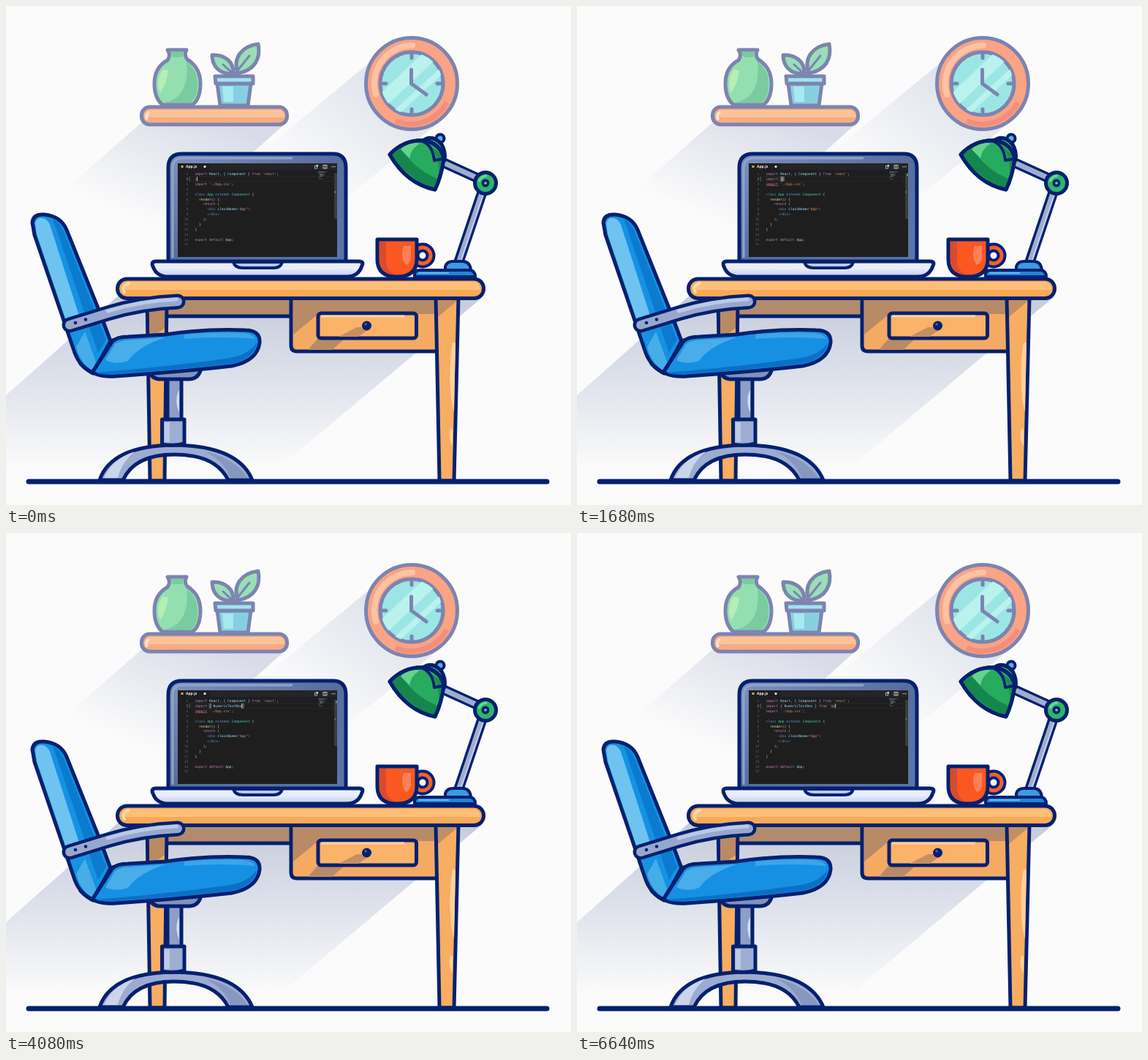
These frames come from a looping animation (773 px wide and 682 px high, 6.8 s). An HTML page:

```html
<!DOCTYPE html>
<html lang="en">
<head>
<meta charset="utf-8">
<title>Desk with code editor</title>
<style>
html, body { margin: 0; width: 100%; height: 100%; overflow: hidden; background: #fbfbfb; }
svg { display: block; width: 773px; height: 682px; }
.ink { stroke: #04206f; stroke-width: 5; stroke-linejoin: round; stroke-linecap: round; }
.soft { stroke: #7c84b0; stroke-width: 5; stroke-linejoin: round; stroke-linecap: round; }
.line { fill: none; }
.code text { font: 4.635px "DejaVu Sans Mono", monospace; white-space: pre; text-rendering: geometricPrecision; }
.code .tab { font: bold 5px "Open Sans", sans-serif; }
</style>
</head>
<body>
<svg viewBox="0 0 773 682">
  <defs>
    <linearGradient id="deskShade" x1="0" y1="395" x2="0" y2="632" gradientUnits="userSpaceOnUse">
      <stop offset="0" stop-color="#c6cbdb"/><stop offset=".45" stop-color="#dce0ea"/><stop offset="1" stop-color="#fbfbfb"/>
    </linearGradient>
    <linearGradient id="shelfShade" x1="290" y1="155" x2="225" y2="310" gradientUnits="userSpaceOnUse">
      <stop offset="0" stop-color="#d9dce8"/><stop offset="1" stop-color="#fbfbfb"/>
    </linearGradient>
    <linearGradient id="clockShade" x1="530" y1="100" x2="420" y2="245" gradientUnits="userSpaceOnUse">
      <stop offset="0" stop-color="#dfe2ec"/><stop offset="1" stop-color="#fbfbfb"/>
    </linearGradient>
    <linearGradient id="lid" x1="0" y1="0" x2="1" y2="1">
      <stop offset="0" stop-color="#7d93bd"/><stop offset=".5" stop-color="#586d9f"/><stop offset="1" stop-color="#5c75aa"/>
    </linearGradient>
    <linearGradient id="base" x1="0" y1="0" x2="0" y2="1">
      <stop offset=".45" stop-color="#e9eefc"/><stop offset="1" stop-color="#bfc9e9"/>
    </linearGradient>
    <clipPath id="faceClip"><circle cx="555" cy="106" r="42"/></clipPath>
    <clipPath id="screenClip"><rect x="235" y="215" width="218" height="128"/></clipPath>
    <clipPath id="shadeClip"><path d="M525 203Q545 182 573 184Q594 188 599 208Q596 232 587 251Q548 243 525 203Z"/></clipPath>
  </defs>

  <rect width="773" height="682" fill="#fbfbfb"/>

  <!-- wall shadows -->
  <path d="M187 158L20 304V350H170L385 158Z" fill="url(#shelfShade)"/>
  <path d="M499 76L310 232L420 300L598 154Z" fill="url(#clockShade)"/>
  <path d="M157 393L0 532V632H372L652 398Z" fill="url(#deskShade)"/>

  <!-- shelf -->
  <rect class="soft" x="185.500" y="138" width="199" height="24" rx="11" fill="#f7ab82"/>
  <path d="M191 149Q192 142 198 142H372Q382 143 381 152H191Z" fill="#fcc397"/>
  <path d="M196 145Q190 148 193 156" class="line" stroke="#ffe2cd" stroke-width="4"/>

  <!-- vase -->
  <path class="soft" d="M221 60H247Q243 67 248 73Q266 84 266 106Q266 127 255 135H214Q203 126 203 106Q203 84 221 74Q226 67 221 60Z" fill="#94dfb0"/>
  <path d="M247 76Q262 87 262 107Q262 124 253 132H216Q252 126 247 76Z" fill="#7acb9f"/>
  <path d="M214 87Q204 103 211 119Q220 106 222 88Z" fill="#b5efb5"/>
  <path d="M225 63H243L241 70H228Z" fill="#7acb9f"/>

  <!-- plant -->
  <path class="soft" d="M311 93C290 93 282 81 282 67C299 66 312 76 311 93Z" fill="#99dfb6"/>
  <path class="soft" d="M317 92C310 71 322 55 345 52C349 72 340 88 317 92Z" fill="#99dfb6"/>
  <path class="soft line" d="M297 80L312 94L333 68" style="stroke-width:3"/>
  <path class="soft" d="M289 106H335L331 136H293Z" fill="#86cfe1"/>
  <path class="soft" d="M286 96H338V106H287Z" fill="#a0e4ee"/>
  <path d="M296 110H311V131H298Z" fill="#a8e8ef"/>

  <!-- clock -->
  <circle class="soft" cx="555" cy="106" r="62.500" fill="#faa385"/>
  <path d="M506 121A52 52 0 0 1 556 54" class="line" stroke="#fdc2a4" stroke-width="8" stroke-linecap="round"/>
  <path d="M603 132A55 55 0 0 1 533 157" class="line" stroke="#f28f7c" stroke-width="7"/>
  <circle class="soft" cx="555" cy="106" r="43" fill="#9be6e5"/>
  <g clip-path="url(#faceClip)" stroke="#baf2ee">
    <path d="M510 134L582 66" stroke-width="18"/>
    <path d="M530 149L603 82" stroke-width="8"/>
  </g>
  <path class="soft line" d="M555 67V71M555 141V145M516 106H520M590 106H594M554.500 87V106L575 121"/>

  <!-- table frame -->
  <rect class="ink" x="194" y="398" width="398" height="26" fill="#b28b6d"/>
  <path class="ink" d="M193 398H220L217 649H197Z" fill="#f7ad62"/>
  <path d="M196 401H217V440L196 456Z" fill="#b98a64"/>
  <path class="ink" d="M390 398H591V472H398Q390 472 390 464Z" fill="#f4aa63"/>
  <path d="M393 401H588V421H427L393 449Z" fill="#b98a66"/>
  <path class="ink" d="M588 398H619L613 649H593Z" fill="#f7ad62"/>
  <path d="M591 401H616V404L591 425Z" fill="#c28f63"/>
  <path d="M611 460Q605 492 609 538L613 555L615 460Z" fill="#ffd09b"/>
  <path d="M608 577L611 579V602Q604 591 608 577Z" fill="#ffd09b"/>
  <path d="M427 454L413 470H446L464 454Z" fill="#b98a66"/>
  <rect class="ink" x="427" y="420" width="134.500" height="34" rx="4" fill="#fbb269"/>
  <path d="M488 439L498 441L482 452H455L480 439Z" fill="#c58f61"/>
  <path d="M431 424H545" stroke="#ffd3a0" stroke-width="3"/>
  <circle cx="493.500" cy="437" r="6.500" fill="#04206f"/>
  <circle cx="492" cy="435" r="1.700" fill="#526399"/>
  <rect class="ink" x="152.500" y="373" width="501" height="26.500" rx="13" fill="#f8a958"/>
  <path d="M158 386Q159 377 168 377H640Q648 378 649 388H160Z" fill="#ffbf79"/>
  <path d="M168 379Q157 383 162 391" class="line" stroke="#ffdba9" stroke-width="4" stroke-linecap="round"/>

  <!-- laptop -->
  <path class="ink" d="M222 350V221Q222 202 241 202H447Q465 202 465 221V350Z" fill="url(#lid)"/>
  <path d="M228 344V222Q228 208 242 208H392" class="line" stroke="#91a4c8" stroke-width="3"/>
  <path class="ink" d="M205 349H483Q490 349 487 355Q482 370 466 370H222Q206 370 201 356Q198 349 205 349Z" fill="url(#base)"/>
  <path class="ink" d="M311 350Q313 358 324 358H366Q376 358 378 350Z" fill="#b8c8ef" style="stroke-width:4"/>
  <g id="screen" class="code" clip-path="url(#screenClip)"></g>

  <!-- mug -->
  <circle class="ink line" cx="570" cy="341" r="11" style="stroke-width:13"/>
  <circle class="line" cx="570" cy="341" r="11" stroke="#f2602f" stroke-width="5"/>
  <path class="ink" d="M508 319H562V346Q562 370 535 370Q508 370 508 346Z" fill="#fb5721"/>
  <path d="M511 322H520V353Q523 364 532 367Q511 367 511 345Z" fill="#d94b2c"/>
  <path d="M544 328H554V345Q553 352 547 354Q539 344 544 328Z" fill="#ff8057"/>

  <!-- lamp -->
  <path class="line ink" d="M619 351L653 250M594 212L649 237" style="stroke-width:14;stroke-linecap:butt"/>
  <path class="line" d="M619 351L653 250M594 212L649 237" stroke="#9fadcf" stroke-width="7"/>
  <path d="M622 350L655 252" stroke="#c5cee4" stroke-width="2"/>
  <path class="ink" d="M601 361V356Q603 349 612 349H626Q635 350 636 361Z" fill="#3b9be2" style="stroke-width:4"/>
  <path class="ink" d="M559 370V366Q560 361 566 361H635Q642 362 642 370Z" fill="#1d86d8" style="stroke-width:4"/>
  <path d="M564 365H606" stroke="#65b8ed" stroke-width="2"/>
  <circle class="ink" cx="656" cy="242" r="14.500" fill="#2db56b"/>
  <path d="M647 240Q650 232 658 232" class="line" stroke="#6adb91" stroke-width="3"/>
  <circle cx="656" cy="242" r="5.500" fill="#04206f"/>
  <circle cx="656" cy="242" r="1.800" fill="#6adb91"/>
  <circle class="ink" cx="594" cy="181" r="5.500" fill="#62a9e3" style="stroke-width:4"/>
  <path class="ink" d="M569 185Q583 174 596 189Q602 199 600 211L590 214Z" fill="#31b769"/>
  <path class="ink" d="M525 203Q545 182 573 184Q594 188 599 208Q596 232 587 251Q548 243 525 203Z" fill="#27ab5e"/>
  <g clip-path="url(#shadeClip)">
    <path d="M524 203Q556 240 588 251L590 236Q556 222 538 190Z" fill="#16864f"/>
    <path d="M540 196Q553 184 566 188Q554 195 552 208Z" fill="#65d38b"/>
    <path d="M577 188L597 204L591 237Q596 205 577 188Z" fill="#188d55"/>
  </g>
  <path class="ink line" d="M525 203Q545 182 573 184Q594 188 599 208Q596 232 587 251Q548 243 525 203Z"/>
  <path class="ink line" d="M570 185Q584 191 586 211L597 209" style="stroke-width:4"/>

  <!-- chair -->
  <path class="ink" d="M128 648Q144 601 230 600Q318 601 337 648H304Q287 613 230 613Q176 613 160 648Z" fill="#9cabd0"/>
  <path d="M134 645Q145 619 176 609Q158 624 153 645Z" fill="#cad5eb"/>
  <path d="M272 609Q313 618 331 645H307Q298 621 272 609Z" fill="#8797c0"/>
  <path class="ink" d="M221 508H240V568H221Z" fill="#8e9ec6"/>
  <path d="M236 526Q230 540 237 556V526Z" fill="#d2dcef"/>
  <path class="ink" d="M213.500 565H244V598Q229 602 213.500 599Z" fill="#9eaed2"/>
  <path d="M217 569H224V596H217Z" fill="#bdcae4"/>
  <path class="ink" d="M196 497Q198 509 209 510H250Q264 510 267 495Z" fill="#8192bd"/>
  <path class="ink" d="M36 296Q37 284 52 285Q75 287 83 306L128 418L143 458L119 502Q101 493 94 474L77 424L39 313Z" fill="#1791e2"/>
  <path d="M40 297Q42 288 51 290Q59 292 62 305L101 426L81 427L42 312Z" fill="#6fc3f0"/>
  <path d="M64 291Q74 296 79 308L137 456L126 474L84 350Z" fill="#0b7bd0"/>
  <path d="M96 466L108 445L123 486L118 498Q102 488 96 466Z" fill="#47ade9"/>
  <path class="ink" d="M118 501L145 459Q151 452 167 452L218 449Q270 441 327 443Q348 443 347 460Q344 485 309 492Q240 500 150 506Q119 508 102 489" fill="#1690e2"/>
  <path d="M123 501Q220 493 300 482Q332 478 343 460Q341 482 308 489Q230 498 150 503Q130 505 123 501Z" fill="#0c70c6"/>
  <path d="M136 484L149 462Q157 456 174 456L218 453Q181 465 167 485Q150 491 136 484Z" fill="#48ade9"/>
  <path d="M244 449Q292 445 325 447Q337 448 341 455Q299 451 244 455Z" fill="#3ca5e7"/>
  <path class="ink line" d="M118 501L146 457"/>
  <path class="line" d="M87 436L139 420Q185 406 235 404" stroke="#04206f" stroke-width="21" stroke-linecap="round"/>
  <path class="line" d="M87 436L139 420Q185 406 235 404" stroke="#97a7cd" stroke-width="12" stroke-linecap="round"/>
  <path class="line" d="M139 417Q185 403 233 401" stroke="#bcc9e4" stroke-width="5" stroke-linecap="round"/>
  <g fill="#04206f"><circle cx="95" cy="433" r="2.300"/><circle cx="109" cy="428.500" r="2.300"/></g>

  <path class="ink" d="M31 650H740" style="stroke-width:7"/>
</svg>
<script>
const LOOP = 6800, X = 258.5, Y = 229.5, CH = 2.79, ROW = 6.88;
const COLORS = { k: '#c586c0', v: '#9cdcfe', s: '#ce9178', b: '#569cd6', t: '#4ec9b0', f: '#dcdcaa', w: '#d4d4d4', g: '#808080' };
const NAME = 'NumericTextBox';

// One letter of colour before each run of text.
const LINES = [
  'k:import|v: React|w:, { |v:Component|w: } |k:from|s: \'react\'|w:;', '',
  'k:import|s: \'./App.css\'|w:;', '',
  'b:class|t: App|b: extends|t: Component|w: {',
  'f:  render|w:() {',
  'k:    return|w: (',
  'g:      <|b:div|v: className|w:=|s:"App"|g:>',
  'g:      </|b:div|g:>',
  'w:    );', 'w:  }', 'w:}', '',
  'k:export default|v: App|w:;', ''
];

// First letter: v variable, m method, b block.
const LISTS = {
  early: 'bimplements,bimport,mimportScripts,bimport statement,vImage,vImageData,vImageBitmap,vimmediate,vCSSImportRule,vDOMImplementation,vSVGImageElement,vHTMLImageElement',
  import: 'bimport,mimportScripts,bimport statement,vCSSImportRule',
  n: 'vname,vnavigator,bnew,vnull,vNaN,vNumber,vNode',
  nu: 'vNumber,vnull',
  fr: 'vframeElement,vframes,vfrom,vFileReader,bfor,bfor,bforEach,bforin,bforof,mcancelAnimationFrame,vDocumentFragment,vEXT_frag_depth',
  from: 'vfrom,mfromCharCode,mfromEntries,mfromCodePoint,vfromElement,vDOMFromRect,vfromValue'
};

const screen = document.getElementById('screen');
const esc = s => s.replace(/&/g, '&amp;').replace(/</g, '&lt;');
const rect = (x, y, w, h, fill, more = '') => `<rect x="${x}" y="${y}" width="${w}" height="${h}" fill="${fill}" ${more}/>`;
const span = (s, fill) => `<tspan fill="${fill}">${esc(s)}</tspan>`;
const text = (x, y, body, more = '') => `<text x="${x}" y="${y + 1.6}" ${more}>${body}</text>`;
const runs = line => line.split('|').map(r => span(r.slice(2), COLORS[r[0]])).join('');
const rowY = n => Y + n * ROW;

function backdrop() {
  let out = rect(235, 215, 218, 128, '#1e1e1e') + rect(235, 215, 218, 9, '#252526') + rect(235, 215, 43, 9, '#1e1e1e');
  out += rect(239.5, 218, 3, 3, '#dfa43e');
  out += text(246, 219.7, span('App.js', '#f4f4f4'), 'class="tab"');
  out += '<circle cx="272" cy="219.6" r="1.6" fill="#eee"/>';
  out += rect(422.5, 218.5, 3, 3.5, 'none', 'stroke="#9fd0d4" stroke-width=".8"') + rect(424.5, 217, 2.5, 2.5, '#b8d7d9');
  out += rect(434, 217.5, 5, 4.5, 'none', 'stroke="#ddd" stroke-width=".8"') + rect(436.1, 217.5, .8, 4.5, '#ddd');
  for (let i = 0; i < 3; i++) out += `<circle cx="${446 + i * 2}" cy="219.7" r=".65" fill="#ddd"/>`;
  out += rect(449, 228, 4, 63, '#3b3b3d');
  out += rect(254, rowY(1) - 3.4, 193, ROW, 'none', 'stroke="#303033" stroke-width=".6"');
  out += rect(250.7, rowY(1) - 3.4, .9, ROW, '#287ca5');
  [12, 9, 6, 0, 9, 4, 5, 7, 4, 3, 2, 1, 0, 6].forEach((w, i) => {
    if (w) out += rect(427.5 + (i > 4 && i < 10 ? 1.5 : 0), 226 + i * .78, w, .4, i % 3 ? '#6f9c9a' : '#8c7895');
  });
  LINES.forEach((line, i) => {
    out += text(249.3, rowY(i), span(String(i + 1), i === 1 ? '#b5b5b5' : '#626266'), 'text-anchor="end"');
    if (line) out += text(X, rowY(i), runs(line));
  });
  return out;
}

function typed(i) {
  let line = 'k:' + 'import '.slice(0, i + 1), caret = Math.min(i + 1, 7);
  if (i < 12) return { line, caret };
  const gap = i > 12 ? ' ' : '';
  const name = NAME.slice(0, Math.max(0, i - 14));
  const brace = i < 30 ? (i > 28 ? ' }' : '}') : ' }';
  line += `|w:{${gap}|v:${name}|w:${brace}`;
  caret = 8 + gap.length + name.length + (i > 28) + (i > 29);
  const close = 8 + gap.length + name.length + (i > 28);
  if (i > 30) {
    const word = 'from'.slice(0, Math.max(0, i - 31));
    line += `|k: ${word}`;
    caret += 1 + word.length;
  }
  if (i > 40) { line += '|w: '; caret++; }
  if (i > 42) {
    const str = "'@p".slice(0, i - 42);
    line += `|s:${str}'`;
    caret += str.length;
  }
  return { line, caret, braces: i < 31 && [7, close] };
}

function listAt(i) {
  if (i > 0 && i < 3) return ['early', 'im'];
  if (i > 2 && i < 6) return ['import', 'import'.slice(0, i + 1)];
  if (i === 15) return ['n', 'n'];
  if (i === 16 || i === 17) return ['nu', 'nu'];
  if (i === 33 || i === 34) return ['fr', 'fr'];
  if (i > 34 && i < 41) return ['from', 'from'];
}

function marked(word, query) {
  let n = 0;
  return [...word].map(c => {
    const hit = n < query.length && c.toLowerCase() === query[n];
    if (hit) n++;
    return span(c, hit ? '#18a3ff' : '#dedede');
  }).join('');
}

function popup(key, query, caret) {
  const x = Math.min(X + caret * CH, 290), top = rowY(1) + 3.7;
  const items = LISTS[key].split(',');
  let out = rect(x, top, 157, items.length * ROW, '#252526', 'stroke="#414144" stroke-width=".5"');
  out += rect(x, top, 157, ROW, '#062f4a');
  items.forEach((item, i) => {
    const y = top + (i + .5) * ROW, kind = item[0];
    if (kind === 'b') out += rect(x + 2.5, y - 1.7, 3.4, 3.4, 'none', 'stroke="#ccc" stroke-width=".7"');
    else if (kind === 'm') out += rect(x + 2.4, y - 1.8, 3.6, 3.6, '#a57bc4', 'rx="1"');
    else out += rect(x + 2, y - .4, 2, .9, '#75beff') + rect(x + 4, y - 1.2, 2.5, 2.4, '#75beff', 'rx=".6"');
    out += text(x + 8.5, y, marked(item.slice(1), query));
  });
  const hint = { import: 'import', fr: 'var frameElement: Element' }[key];
  if (hint) out += text(x + 153, top + ROW / 2, span(hint, '#b9c6d0'), 'text-anchor="end"');
  return out;
}

const still = backdrop();

function draw(i) {
  const { line, caret, braces } = typed(i), y = rowY(1);
  let out = still;
  if (braces) braces.forEach(c => {
    out += rect(X + c * CH, y - 3, CH, 6, '#263329', 'stroke="#888" stroke-width=".5"');
  });
  out += text(X, y, runs(line));
  out += rect(X + caret * CH - .2, y - 3.1, .7, 6.2, '#e8e8e8');
  if (i > 8 && i < 43) {
    let d = `M${X} ${rowY(2) + 2.7}`;
    for (let n = 0; n < 8; n++) d += `l1.05 ${n % 2 ? .8 : -.8}`;
    d += `l1.05 -.8l1.05 .8l1.05 -.8l1.05 .8l1.05 -.8l1.05 .8l1.05 -.8l1.05 .8`;
    out += `<path d="${d}" fill="none" stroke="#f14c4c" stroke-width=".7"/>`;
    out += rect(451, rowY(0), 2, 3, '#3f9f88');
  }
  out += rect(449.5, 253, 1.5, 2.5, i < 6 ? '#4f9f6b' : '#3f78a8');
  const list = listAt(i);
  if (list) out += popup(list[0], list[1], caret);
  screen.innerHTML = out;
}

// Four keystrokes every 600 ms, after a first short beat.
function stepAt(ms) {
  if (ms < 40) return 0;
  const u = ms - 40, r = u % 600;
  return 1 + 4 * Math.floor(u / 600) + (r >= 160) + (r >= 280) + (r >= 440);
}

let shown = -1;
const start = performance.now();
function tick() {
  const step = stepAt((performance.now() - start) % LOOP);
  if (step !== shown) draw(shown = step);
  requestAnimationFrame(tick);
}
tick();
</script>
</body>
</html>
```
